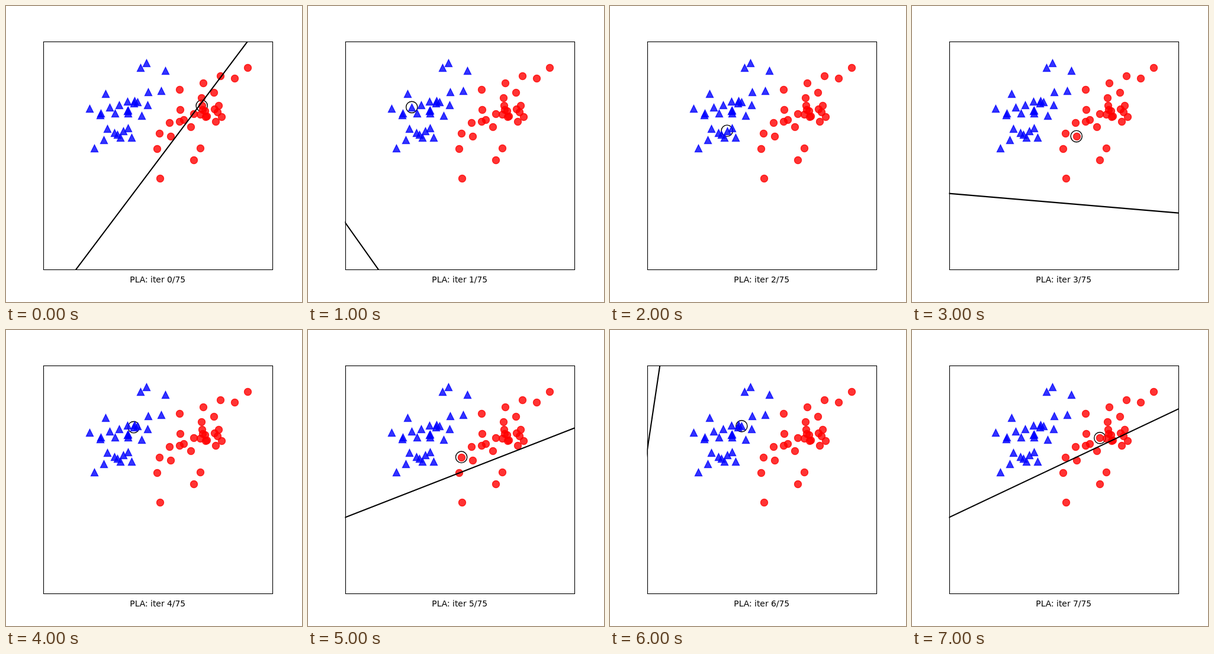
Animation of 500x500 px, one loop 8000 ms. Source, as an HTML page:

```html
<!DOCTYPE html>
<html lang="en">
<head>
<meta charset="utf-8">
<title>Perceptron iterations</title>
<style>
  html, body { margin: 0; width: 100%; height: 100%; overflow: hidden; background: #fff; }
  svg { display: block; width: 500px; height: 500px; }
  .mark { stroke-width: 1.39; fill-opacity: .8; stroke-opacity: .8; }
  .blue { fill: #00f; stroke: #00f; }
  .red { fill: #f00; stroke: #f00; }
  .ink { fill: none; stroke: #000; }
  text { font: 13.89px "DejaVu Sans", sans-serif; text-anchor: middle; }
</style>
</head>
<body>
<svg viewBox="0 0 500 500">
  <clipPath id="area"><rect x="62.5" y="60" width="387.5" height="385"/></clipPath>
  <circle id="pick" class="ink" r="9.66" stroke-width="1.39"/>
  <g id="points"></g>
  <g clip-path="url(#area)"><line id="border" class="ink" stroke-width="2.08"/></g>
  <rect class="ink" x="63.5" y="60.5" width="387" height="385" stroke-width="1.11"/>
  <text id="label" x="256.25" y="467"></text>
</svg>
<script>
const COUNT = 30, STEP_MS = 1000;

// Axes run from 0 to 6 and from -2 to 4.
const px = x => 62.5 + x * 387.5 / 6;
const py = y => 445 - (y + 2) * 385 / 6;

// Mersenne Twister giving doubles in [0, 1).
function twister(seed) {
  const N = 624, s = new Uint32Array(N);
  s[0] = seed;
  for (let i = 1; i < N; i++) s[i] = Math.imul(1812433253, s[i - 1] ^ (s[i - 1] >>> 30)) + i;
  let at = N;
  function next() {
    if (at === N) {
      for (let i = 0; i < N; i++) {
        const v = (s[i] & 0x80000000) | (s[(i + 1) % N] & 0x7fffffff);
        s[i] = s[(i + 397) % N] ^ (v >>> 1) ^ (v & 1 ? 0x9908b0df : 0);
      }
      at = 0;
    }
    let v = s[at++];
    v ^= v >>> 11;
    v ^= (v << 7) & 0x9d2c5680;
    v ^= (v << 15) & 0xefc60000;
    return (v ^ (v >>> 18)) >>> 0;
  }
  return () => ((next() >>> 5) * 2 ** 26 + (next() >>> 6)) / 2 ** 53;
}

const random = twister(2);

// Two independent normal values by the polar method.
function normalPair() {
  let a, b, r;
  do {
    a = 2 * random() - 1;
    b = 2 * random() - 1;
    r = a * a + b * b;
  } while (r >= 1 || r === 0);
  const f = Math.sqrt(-2 * Math.log(r) / r);
  return [f * b, f * a];
}

// Normal cloud with variance 0.3 and covariance 0.2.
const cloud = (mx, my, sign) => Array.from({ length: COUNT }, () => {
  const [u, v] = normalPair();
  const along = -u * Math.sqrt(.25), across = v * Math.sqrt(.05);
  return { x: mx + along - across, y: my + along + across, sign };
});

const blue = cloud(2, 2, 1);
const red = cloud(4, 2, -1);
const points = [...blue, ...red];

const nearest = ([x, y]) => points.reduce((a, b) =>
  Math.hypot(b.x - x, b.y - y) < Math.hypot(a.x - x, a.y - y) ? b : a);

// Misclassified points in the order they are visited.
const picks = [
  [4.15, 2.31], [1.75, 2.27], [2.09, 1.65], [3.33, 1.51],
  [2.37, 2.38], [3.04, 1.59], [2.47, 2.40], [3.95, 2.10]
].map(nearest);

// Perceptron rule: each pick moves the weights by its signed coordinates.
let weights = [-1, .424, -.317];
const steps = picks.map(pick => {
  const step = { pick, weights };
  const [b, wx, wy] = weights;
  weights = [b + pick.sign, wx + pick.sign * pick.x, wy + pick.sign * pick.y];
  return step;
});

const $ = id => document.getElementById(id);
const setAttrs = (el, attrs) => {
  for (const k in attrs) el.setAttribute(k, attrs[k]);
  return el;
};
const add = (tag, attrs) =>
  $('points').append(setAttrs(document.createElementNS('http://www.w3.org/2000/svg', tag), attrs));

// Markers sit on pixel centres.
const snap = v => Math.round(v) + .5;
for (const { x, y } of blue)
  add('path', { class: 'mark blue', d: `M${snap(px(x))} ${snap(py(y)) - 6}l-6 12h12z` });
for (const { x, y } of red)
  add('circle', { class: 'mark red', cx: snap(px(x)), cy: snap(py(y)), r: 6 });

let shown = -1;
function show(i) {
  const { pick, weights: [b, wx, wy] } = steps[i];
  const lineY = x => py(-(b + wx * x) / wy);
  setAttrs($('pick'), { cx: px(pick.x), cy: py(pick.y) });
  setAttrs($('border'), { x1: px(-1), y1: lineY(-1), x2: px(7), y2: lineY(7) });
  $('label').textContent = `PLA: iter ${i}/75`;
  shown = i;
}

let start;
function tick(now) {
  start ??= now;
  const i = Math.floor((now - start) / STEP_MS) % steps.length;
  if (i !== shown) show(i);
  requestAnimationFrame(tick);
}
show(0);
requestAnimationFrame(tick);
</script>
</body>
</html>
```
